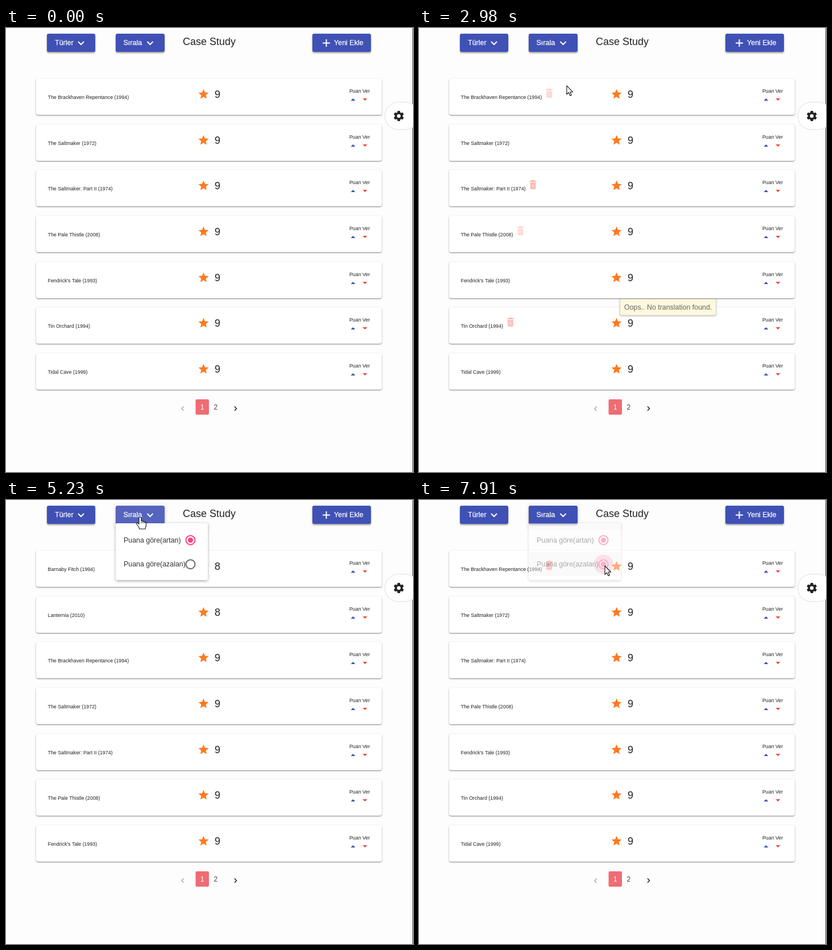
An HTML page with a canvas that plays this animation: 716 px wide and 782 px high, repeating every 7.99 s.

```html
<!DOCTYPE html>
<html lang="tr">
<head>
<meta charset="utf-8">
<title>Case Study</title>
<style>
  html, body { margin: 0; width: 100%; height: 100%; overflow: hidden; background: #fdfdfd; }
  canvas { display: block; }
</style>
</head>
<body>
<canvas id="stage" width="716" height="782"></canvas>
<script>
const ctx = document.getElementById('stage').getContext('2d');
const LOOP = 7990, LAST_CHANGE = 7910, PITCH = 80.67;
const INDIGO = '#3f51b5', PINK = '#ff4081';

const best = ['The Brackhaven Repentance (1994)', 'The Saltmaker (1972)', 'The Saltmaker: Part II (1974)',
  'The Pale Thistle (2008)', "Fendrick's Tale (1993)", 'Tin Orchard (1994)', 'Tidal Cave (1999)'].map(name => [name, 9]);
const low = [['Barnaby Fitch (1994)', 8], ['Lanternia (2010)', 8]];
const ascending = [...low, ...best.slice(0, 5)];
const secondPage = [...low, best[1], best[1], best[1]];

// time, x, y, cursor shape used until the next key
const moves = [
  [120, 627, 768, 'arrow'], [360, 398, 694, 'arrow'], [510, 385, 685, 'arrow'], [600, 367, 672, 'hand'],
  [800, 367, 672, 'arrow'], [1220, 337, 526, 'arrow'], [1670, 337, 526, 'arrow'], [1800, 345, 507, 'hand'],
  [1950, 345, 507, 'arrow'], [2810, 345, 507, 'arrow'], [2980, 260, 102, 'arrow'], [3200, 240, 38, 'arrow'],
  [3360, 236, 30, 'hand'], [3700, 236, 30, 'hand'], [4140, 319, 71, 'hand'], [4620, 319, 71, 'arrow'],
  [4840, 319, 71, 'arrow'], [5040, 236, 30, 'hand'], [5250, 236, 30, 'hand'], [5590, 300, 118, 'hand'],
  [5660, 300, 118, 'hand'], [5820, 313, 112, 'hand'], [6360, 313, 112, 'arrow'], [6510, 313, 112, 'arrow'],
  [6680, 236, 30, 'hand'], [6900, 236, 30, 'arrow'], [7210, 353, 148, 'arrow'], [7370, 353, 148, 'arrow'],
  [7440, 327, 116, 'arrow']
];
const clicks = [600, 1830, 3440, 4300, 5080, 6720, 7670];
const menus = [[3500, 4500], [5100, 6240], [6760, 7840]];
// row, fade-in start and end, fade-out start and end
const bins = [[5, 2350, 2510, 2810, 3060], [3, 2830, 2880, 2900, 3000], [2, 2860, 2910, 2930, 3010],
  [0, 2950, 3100, 3110, 3200], [0, 7860, 7970, 8000, 8100]];

const star = new Path2D('M12 17.27L18.18 21l-1.64-7.03L22 9.24l-7.19-.61L12 2 9.19 8.63 2 9.24l5.46 4.73L5.82 21z');
const shapes = {
  arrow: new Path2D('M0 0V15L3.5 12L6 17.5L8.3 16.5L6 11H10.5Z'),
  hand: new Path2D('M-2 1.5Q-2 0 0 0T2 1.5V7Q4 6 5 8Q7 7 8 9Q10 8.5 10.5 10.5V15Q9.5 18 9 21H-1Q-2 18-5 14Q-7.5 11-5.5 10Q-4 10-2 12.5Z')
};

const ramp = (t, a, b) => Math.max(0, Math.min(1, (t - a) / (b - a)));
const within = (t, a, b) => t >= a && t < b;
const openMenu = t => menus.find(m => within(t, m[0], m[1] + 120));

function group(x, y, alpha, draw) {
  ctx.save();
  ctx.translate(x, y);
  ctx.globalAlpha *= alpha;
  draw();
  ctx.restore();
}

function text(str, x, y, size, color = '#222', align = 'left') {
  ctx.font = `${size}px "Liberation Sans", Arial, sans-serif`;
  ctx.textAlign = align;
  ctx.fillStyle = color;
  ctx.fillText(str, x, y);
}

function box(x, y, w, h, r, color) {
  ctx.beginPath();
  ctx.roundRect(x, y, w, h, r);
  ctx.fillStyle = color;
  ctx.fill();
}

function raised(x, y, w, h, r, color, drop, blur, alpha) {
  ctx.save();
  ctx.shadowColor = `rgba(0,0,0,${alpha})`;
  ctx.shadowOffsetY = drop;
  ctx.shadowBlur = blur;
  box(x, y, w, h, r, color);
  ctx.restore();
}

function line(points, color, width) {
  ctx.beginPath();
  points.forEach(p => ctx.lineTo(...p));
  ctx.strokeStyle = color;
  ctx.lineWidth = width;
  ctx.stroke();
}

function poly(points, color) {
  ctx.beginPath();
  points.forEach(p => ctx.lineTo(...p));
  ctx.fillStyle = color;
  ctx.fill();
}

function disc(x, y, r, color) {
  ctx.beginPath();
  ctx.arc(x, y, r, 0, 7);
  ctx.fillStyle = color;
  ctx.fill();
}

function button(x, w, label, labelX, color = INDIGO) {
  raised(x, 10, w, 32, 3, color, 2, 3, .4);
  text(label, labelX, 30, 12.5, '#fff');
  ctx.strokeStyle = '#fff';
  ctx.lineWidth = .25;
  ctx.strokeText(label, labelX, 30);
}

const chevronDown = x => line([[x - 5, 24], [x, 29], [x + 5, 24]], '#fff', 2);

function header(t) {
  if (openMenu(t)) {
    box(188, 5, 96, 43, 4, '#f7f7f7');
    box(189, 38, 169, 15, 3, '#f7f7f7');
  }
  const focused = menus.some(m => within(t, m[0] - 60, m[0] + 600));
  button(72, 85, 'Türler', 86);
  chevronDown(132);
  button(193, 86, 'Sırala', 206.5, focused ? '#5664be' : INDIGO);
  chevronDown(253.5);
  button(539, 103, 'Yeni Ekle', 577);
  line([[557, 26.5], [570, 26.5]], '#fff', 2);
  line([[563.5, 20], [563.5, 33]], '#fff', 2);
  text('Case Study', 311, 30, 18);
}

function trash(x, y, alpha) {
  group(x, y, alpha, () => {
    box(0, 1, 12, 2, 0, '#f44336');
    box(3.5, 0, 5, 2, 0, '#f44336');
    box(1, 4, 10, 12, [0, 0, 2, 2], '#f44336');
    line([[3.7, 7.5], [8.3, 12.5]], '#fff', 1.4);
    line([[8.3, 7.5], [3.7, 12.5]], '#fff', 1.4);
  });
}

function card([name, score], row, t) {
  group(0, Math.round(row * PITCH), 1, () => {
    raised(53, 89, 608, 64, 4, '#fff', 1, 3, .3);
    raised(53, 89, 608, 64, 4, '#fff', 1, 1, .24);
    text(name, 73.5, 125, 8.85);
    const end = 73.5 + ctx.measureText(name).width;
    for (const [r, a, b, c, d] of bins) {
      if (r === row && within(t, a, d)) trash(end + 7, 107, ramp(t, a, b) * (1 - ramp(t, c, d)));
    }
    group(336.7, 105.7, 1, () => {
      ctx.scale(.9, .9);
      ctx.fillStyle = '#ff7a1f';
      ctx.fill(star);
    });
    text(score, 367, 123, 18);
    text('Puan Ver', 604, 114, 8.8);
    poly([[606.5, 128], [610.5, 124], [614.5, 128]], INDIGO);
    poly([[627.5, 124], [631.5, 128], [635.5, 124]], '#f44336');
  });
}

function pager(t, second) {
  const mix = ramp(t, 700, 1360) - ramp(t, 1950, 2660);
  group(0, second ? -161 : 0, 1, () => {
    [1 - mix, mix].forEach((lit, i) => {
      const x = 333.5 + i * 23.5;
      group(0, 0, lit, () => box(x, 654, 23.5, 27, 2, '#ef6c74'));
      const idle = second && !i ? '#3a6ea5' : '#444';
      text(i + 1, x + 11.8, 672, 12, lit > .5 ? '#fff' : idle, 'center');
    });
    line([[312.5, 666.5], [309, 670.3], [312.5, 674]], second ? '#222' : '#aaa', 1.5);
    line([[402, 666.5], [405.5, 670.3], [402, 674]], second ? '#aaa' : '#222', 1.5);
  });
}

function settings() {
  box(715, 0, 1, 782, 0, '#555');
  ctx.beginPath();
  ctx.roundRect(666.5, 130.5, 60, 48.5, 24);
  ctx.fillStyle = '#fff';
  ctx.fill();
  ctx.strokeStyle = '#dcdcdc';
  ctx.lineWidth = 1;
  ctx.stroke();
  group(691, 155, 1, () => {
    disc(0, 0, 6.6, '#222');
    for (let i = 0; i < 6; i++) {
      poly([[-3, -5], [-2, -9], [2, -9], [3, -5]], '#222');
      ctx.rotate(Math.PI / 3);
    }
    disc(0, 0, 3.2, '#fff');
  });
}

function radio(y, on) {
  ctx.beginPath();
  ctx.arc(324.5, y, 8, 0, 7);
  ctx.strokeStyle = on ? PINK : '#6b6b6b';
  ctx.lineWidth = 2;
  ctx.stroke();
  if (on) disc(324.5, y, 4.5, PINK);
}

// The panel is painted on its own layer so that it fades as one piece.
const layer = document.createElement('canvas');
layer.width = 716;
layer.height = 782;
const layerCtx = layer.getContext('2d');

function menuPanel(t, mouse) {
  const menu = openMenu(t);
  if (!menu) return 0;
  const rows = [['Puana göre(artan)', t >= 4420, 4322], ['Puana göre(azalan)', t >= 7720, 5970]];
  raised(193, 41, 162, 100, 3, '#fff', 2, 5, .32);
  rows.forEach(([label, on, pressed], i) => {
    const top = 49 + i * 42.5, mid = top + 21.7;
    if (within(mouse.x, 193, 355) && within(mouse.y, top, top + 42.5)) box(193, top, 162, 42.5, 0, '#f4f4f4');
    if (pressed > menu[0] && t >= pressed) {
      ctx.save();
      ctx.beginPath();
      ctx.rect(193, top, 162, 42.5);
      ctx.clip();
      disc(mouse.x, mid, Math.min(150, (t - pressed) * .9), 'rgba(0,0,0,.1)');
      ctx.restore();
    }
    const tapped = i ? t >= 7670 : within(t, 4300, 4620);
    if (tapped) disc(324.5, mid, 17, 'rgba(233,30,99,.28)');
    text(label, 207, top + 25.5, 12.4, '#333');
    radio(mid, on);
  });
  return ramp(t, menu[0], menu[0] + 120) * (1 - ramp(t, menu[1], menu[1] + 120));
}

function tooltip() {
  raised(353, 477, 170, 29.5, 3, '#d9d6c4', 1, 3, .25);
  box(354, 478, 168, 27.5, 2, '#fdf8de');
  text('Oops.. No translation found.', 361, 496, 12.4, '#666');
}

function pointer(t) {
  const i = moves.findLastIndex(m => m[0] <= t);
  if (i < 0) return { x: -99, y: -99, shape: 'arrow' };
  const [a, x, y, shape] = moves[i];
  const [b, nx, ny] = moves[i + 1] || [a + 1, x, y];
  const k = ramp(t, a, b);
  return { x: x + (nx - x) * k, y: y + (ny - y) * k, shape };
}

function drawPointer({ x, y, shape }, t) {
  if (clicks.some(c => within(t, c, c + 130))) disc(x, y, 11, 'rgba(244,208,40,.8)');
  group(x, y, 1, () => {
    ctx.fillStyle = '#fff';
    ctx.fill(shapes[shape]);
    ctx.strokeStyle = '#111';
    ctx.lineWidth = 1.1;
    ctx.lineJoin = 'round';
    ctx.stroke(shapes[shape]);
    if (shape === 'hand') {
      for (const dx of [2, 5, 8]) line([[dx, 8], [dx, 11]], '#111', 1);
    }
  });
}

function scene(t) {
  const mouse = pointer(t);
  ctx.clearRect(0, 0, 716, 782);
  const fade = menuPanel(t, mouse);
  layerCtx.clearRect(0, 0, 716, 782);
  layerCtx.drawImage(ctx.canvas, 0, 0);

  box(0, 0, 716, 782, 0, '#fdfdfd');
  const second = within(t, 690, 1940);
  const list = second ? secondPage : within(t, 4450, 7750) ? ascending : best;
  header(t);
  list.forEach((film, row) => card(film, row, t));
  pager(t, second);
  settings();
  group(0, 0, fade, () => ctx.drawImage(layer, 0, 0));
  if (within(t, 2200, 3100)) tooltip();
  drawPointer(mouse, t);
}

function tick() {
  scene(Math.min(performance.now() % LOOP, LAST_CHANGE));
  requestAnimationFrame(tick);
}
tick();
</script>
</body>
</html>
```
